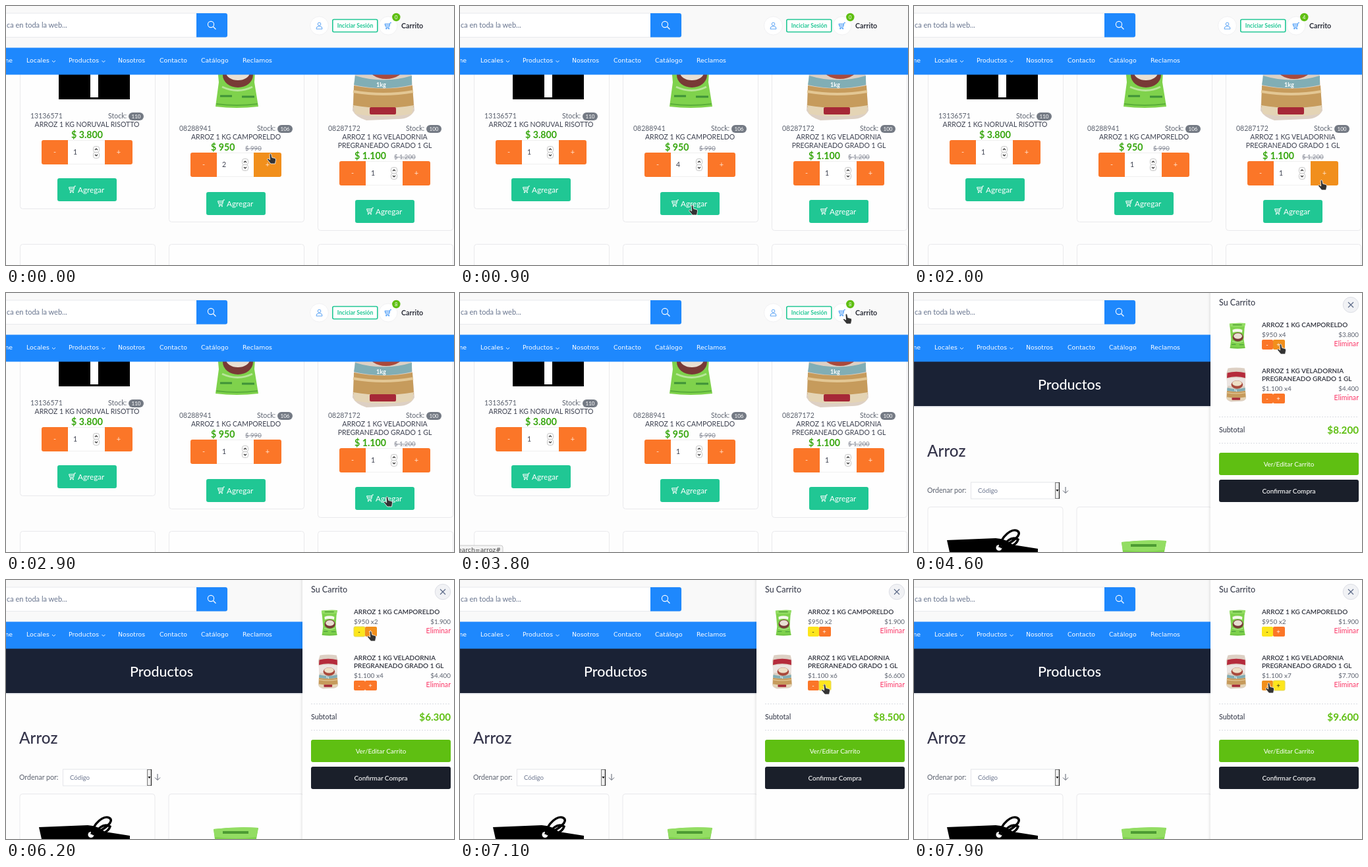
Write an HTML page that moves like this. It is 680 px wide and 394 px high and loops after 8000 ms.

```html
<!DOCTYPE html>
<html lang="es">
<head>
<meta charset="utf-8">
<title>Carrito</title>
<style>
html, body { margin: 0; width: 100%; height: 100%; overflow: hidden; background: #fdfdfd }
svg { display: block; width: 680px; height: 394px }
text { font-family: Lato, "Open Sans", sans-serif; white-space: pre }
.nav { font-family: "DejaVu Sans", sans-serif }
</style>
</head>
<body>
<svg id="stage" viewBox="0 0 680 394"></svg>
<script>
const stage = document.getElementById('stage');
const $ = id => document.getElementById(id);
const INK = '#3d4150', GRAY = '#5b616e', BLUE = '#1e88fd', ORANGE = '#fb7628',
      AMBER = '#f18f1c', YELLOW = '#fde61c', TEAL = '#20c794', GREEN = '#5fbf12';

const rect = (x, y, w, h, fill, more = '') =>
  `<rect x="${x}" y="${y}" width="${w}" height="${h}" fill="${fill}" ${more}/>`;
const circle = (x, y, r, fill, more = '') =>
  `<circle cx="${x}" cy="${y}" r="${r}" fill="${fill}" ${more}/>`;
const path = (d, fill = 'none', stroke = 'none', w = 1, more = '') =>
  `<path d="${d}" fill="${fill}" stroke="${stroke}" stroke-width="${w}" ${more}/>`;
const text = (x, y, s, size, fill = INK, more = '') =>
  `<text x="${x}" y="${y}" font-size="${size}" fill="${fill}" ${more}>${s}</text>`;
const group = (s, more = '') => `<g ${more}>${s}</g>`;
const at = (x, y, s, k = 1) => group(s, `transform="translate(${x} ${y}) scale(${k})"`);
const MID = 'text-anchor="middle"', END = 'text-anchor="end"';
const BOLD = 'font-weight="700"', MEDIUM = 'font-weight="500"';

const trolley = (x, y, color, k = 1) =>
  at(x, y, path('M11 0H9L7.6 6.5H2L.5 1.8H8.6M1.3 4H8M2 8.3H7.6', 'none', color, 1) +
    circle(2.8, 9.5, .9, color) + circle(7, 9.5, .9, color), k);

// Rice bags, drawn at catalogue size
const greenBag =
  path('M1 2Q35-2 69 0L65 22 62 70 68 107Q35 111 3 107L8 70 4 25Z', '#7fd24c') +
  path('M1 2Q35-2 69 0L66 14Q35 18 3 14Z', '#93dd63') +
  path('M15 7H54', 'none', '#4d9b33', 4) +
  path('M14 28Q35 20 56 28L55 40Q35 33 15 40Z', '#f6f8ee') +
  '<ellipse cx="37" cy="59" rx="23" ry="19" fill="#783a36"/>' +
  '<ellipse cx="37" cy="55" rx="18" ry="12" fill="#e9dfd2"/>' +
  path('M13 77Q37 88 59 77', 'none', '#b9e69a', 3) +
  path('M10 91H28M43 92H62', 'none', '#3f9238', 3) +
  path('M4 103Q35 107 67 103', 'none', '#5aae39', 2);
const brownBag =
  path('M8 3Q48-3 88 3L94 30 90 90 95 150Q88 163 70 163L22 165Q6 160 1 150L5 90 0 30Z', '#ddd0c4') +
  path('M5 25Q48 14 91 25L92 50Q48 38 3 50Z', '#b52b3c') +
  path('M3 53Q48 42 92 53L90 88H5Z', '#ece5e2') +
  '<ellipse cx="52" cy="82" rx="28" ry="20" fill="#a94a3c"/>' +
  '<ellipse cx="52" cy="76" rx="23" ry="13" fill="#eee0c7"/>' +
  path('M5 97Q48 110 91 97V111Q48 121 3 111Z', '#81aeb5') +
  path('M3 112Q48 121 92 112L94 145Q48 155 2 145Z', '#c69b5c') +
  text(37, 114, '1kg', 9, '#fff', BOLD) +
  path('M2 121Q48 129 93 121', 'none', '#e3c794', 4) +
  path('M2 142Q48 150 94 142L91 155Q48 163 5 155Z', '#e4d4b5') +
  rect(27, 145, 40, 11, '#a62837', 'rx="2"');

const card = (x, y, h) => rect(x + .5, y + .5, 205, h, '#fefefe', 'rx="4" stroke="#e9e9ec"');

// Product cards: [x, id line, stock, code, title lines, price, old price, controls y, button y, bottom]
const products = [
  [21, 171, 110, '13136571', ['ARROZ 1 KG NORUVAL RISOTTO'], '$ 3.800', '', 204, 262, 308],
  [247, 190, 106, '08288941', ['ARROZ 1 KG CAMPORELDO'], '$ 950', '$ 990', 223, 283, 328],
  [473, 190, 100, '08287172', ['ARROZ 1 KG VELADORNIA', 'PREGRANEADO GRADO 1 GL'], '$ 1.100', '$ 1.200', 236, 295, 341]
];
const zones = [];   // clickable areas: {id, x, y, w, h, view}
const zone = (id, x, y, w, h, view) => zones.push({ id, x, y, w, h, view });

function product([x, y, stock, code, lines, price, old, cy, by, bottom], i) {
  zone('less' + i, x + 33, cy, 40, 37, 'list');
  zone('more' + i, x + 129, cy, 42, 37, 'list');
  zone('', x + 57, by, 90, 35, 'list');
  const mid = x + 102, py = cy - 3;
  const arrow = (ay, d) => rect(x + 111.5, ay, 9, 9, '#fff', 'rx="3" stroke="#b5b5b5" stroke-width=".8"') +
    path(`M${x + 114} ${ay + 4.5 - d}l2 ${2 * d} 2 ${-2 * d}`, 'none', '#333', 1.2);
  return card(x, 50, bottom - 50) +
    text(x + 16, y, code, 10.5, GRAY) + text(x + 134, y, 'Stock:', 10.5, GRAY) +
    rect(x + 165, y - 9, 23, 12, '#747a84', 'rx="6"') + text(x + 176.5, y, stock, 8, '#fff', MID) +
    lines.map((s, n) => text(mid, y + 13 + n * 12.5, s, 10.5, INK, MID)).join('') +
    (old
      ? text(x + (i == 1 ? 64 : 56), py, price, 14.2, '#36a60d', BOLD) +
        text(x + 116, py, old, 9.6, '#858995', 'text-decoration="line-through"')
      : text(mid, py - 0, price, 14.2, '#36a60d', BOLD + MID.padStart(MID.length + 1))) +
    rect(x + 72, cy + .5, 58, 36, '#fff', 'stroke="#f0f0f0"') +
    path(`M${x + 73} ${cy}h-37q-3 0-3 3v31q0 3 3 3h37z`, ORANGE, 'none', 1, `id="less${i}"`) +
    path(`M${x + 129} ${cy}h39q3 0 3 3v31q0 3-3 3h-39z`, ORANGE, 'none', 1, `id="more${i}"`) +
    text(x + 53, cy + 22, '-', 11, '#ffe3cf', MID) + text(x + 150, cy + 22, '+', 11, '#ffe3cf', MID) +
    text(x + 81, cy + 22, 1, 10.5, INK, `id="qty${i}"`) +
    arrow(cy + 9.5, -1) + arrow(cy + 18.5, 1) +
    rect(x + 57, by, 90, 35, TEAL, 'rx="3"') +
    trolley(x + 74, by + 12, '#fff') + text(x + 88, by + 22, 'Agregar', 11.7, '#fff');
}

const list = group(
  products.map(product).join('') +
  rect(80, 100, 108, 42, '#000') + rect(128, 100, 12, 39, '#fff') +
  at(315, 46, greenBag) + at(525, 9, brownBag) +
  [21, 247, 473].map(x => card(x, 362, 60)).join('') +
  group(rect(-5, 384, 70, 20, '#f4f4f4', 'rx="3" stroke="#c8c8c8"') +
    text(62, 393.5, 'earch=arroz#', 9.3, '#444', END + ' class="nav"'), 'id="status"'),
  'id="list"');

const catalogue = group(
  rect(0, 104, 680, 68.5, '#1a2235') + rect(0, 172, 680, 2, '#e9eaee') +
  text(236, 147, 'Productos', 21.5, '#fff', `${MID} ${MEDIUM}`) +
  text(20, 249, 'Arroz', 24.3, '#34344a', MEDIUM) +
  text(20, 304, 'Ordenar por:', 10.6, GRAY) +
  rect(86.5, 288, 134, 25, '#fff', 'stroke="#e4e6ea"') + text(97, 304, 'Código', 9.7, '#6d7790') +
  rect(214.5, 288.5, 6, 24, '#eee', 'stroke="#777"') + path('M215.500 299h4l-2 3z', '#000') +
  path('M220.500 288V313', 'none', '#222', 1.2) +
  path('M230 295V304M226 300.500l4 4 4-4', 'none', GRAY, 1) +
  [21, 247, 473].map(x => card(x - .5, 325, 100)).join('') +
  path('M50 376L124 373Q140 374 150 383L188 389V394H54Z', '#000') +
  circle(129, 387.5, 4.5, '#fff') +
  path('M130 387C132 370 149 357 157 362S151 379 131 387M134 385Q148 368 158 375Q156 382 146 386', 'none', '#000', 3.5) +
  at(314, 377, greenBag) + at(526, 355, brownBag),
  'id="catalogue"');

const menu = [[31, 'Locales'], [95, 'Productos'], [170, 'Nosotros'], [233, 'Contacto'], [296, 'Catálogo'], [359, 'Reclamos']];
const header =
  rect(0, 0, 680, 64, '#f9f9f9') +
  rect(-5, 11, 341, 36.5, '#fff', 'rx="3" stroke="#e8e9ed"') +
  text(1, 33, 'ca en toda la web...', 11, '#67748e') +
  path('M289 11h44q3 0 3 3v30.500q0 3-3 3h-44z', BLUE) +
  circle(311, 28, 4.6, 'none', 'stroke="#fff" stroke-width="1.100"') + path('M314.500 31.500l4 4', 'none', '#fff', 1.2) +
  circle(475.5, 30, 14, '#fff', 'stroke="#f1f1f3"') +
  circle(475.5, 27.5, 2.3, 'none', 'stroke="#5ba4f5"') +
  path('M471 35q0-4 3-4h3q3 0 3 4z', 'none', '#5ba4f5', 1) +
  rect(495.8, 20.5, 68, 19, '#fff', `rx="2" stroke="${TEAL}" stroke-width="1.600"`) +
  text(530, 33, 'Inciciar Sesión', 8.6, TEAL, `${MID} ${BOLD}`) +
  circle(580, 30, 14, '#fff', 'stroke="#f1f1f3"') + trolley(574.5, 25.5, '#3c94f7', .95) +
  circle(592.3, 17, 6.2, GREEN) + text(592.3, 19.8, 0, 7.5, '#fff', MID + ' id="badge"') +
  text(600, 33.5, 'Carrito', 10.7, '#2c2f3a', BOLD) +
  rect(0, 63.5, 680, 41, BLUE) +
  text(10, 86, 'Home', 9.35, '#fff', END + ' class="nav"') +
  menu.map(([x, s]) => text(x, 86, s, 9.35, '#fff', 'class="nav"')).join('') +
  [72.5, 148].map(x => path(`M${x - 2.5} 83l2.500 2.500 2.500-2.500`, 'none', '#fff', .9)).join('');
zone('cart', 567, 16, 28, 28, 'list');

// Cart rows: [name lines, unit price, name y]
const rows = [
  [['ARROZ 1 KG CAMPORELDO'], 950, 52],
  [['ARROZ 1 KG VELADORNIA', 'PREGRANEADO GRADO 1 GL'], 1100, 121.5]
];
function row([lines, , y], i) {
  const base = y + 12.5 * (lines.length - 1), by = Math.round(base + 19);
  zone('minus' + i, 528, by, 17, 15, 'catalogue');
  zone('plus' + i, 545, by, 18, 15, 'catalogue');
  return lines.map((s, n) => text(528, y + n * 12.2, s, 10, '#2d303b', 'font-weight="600"')).join('') +
    text(528, base + 14.5, '', 10, GRAY, `id="unit${i}"`) +
    text(675, base + 14.5, '', 9.8, GRAY, `${END} id="sum${i}"`) +
    text(675, base + 29, 'Eliminar', 10.6, '#fb3767', END) +
    rect(528, by, 17, 15, ORANGE, `rx="2" id="minus${i}"`) +
    rect(545, by, 18, 15, ORANGE, `rx="2" id="plus${i}"`) +
    text(536, by + 11, '-', 9.5, '#fff', `${MID} id="minus${i}s"`) +
    text(553, by + 11, '+', 9.5, '#fff', `${MID} id="plus${i}s"`);
}
const dashes = y => path(`M463 ${y}H675`, 'none', '#d9dce2', 1, 'stroke-dasharray="2 2"');
const panel = group(
  rect(446, 0, 2, 394, '#000', 'opacity=".02"') + rect(448, 0, 2, 394, '#000', 'opacity=".06"') +
  rect(450, 0, 460, 394, '#fefefe') +
  text(463, 19, 'Su Carrito', 12.5, INK, MEDIUM) +
  circle(663, 18, 11.7, '#f1f2f5', 'stroke="#dcdee5"') +
  path('M659 14l8 8M667 14l-8 8', 'none', '#596786', 1.1) +
  at(478.5, 46, greenBag, .355) + at(474, 113.5, brownBag, .315) +
  rows.map(row).join('') +
  dashes(188.5) + dashes(228.5) +
  text(463, 212, 'Subtotal', 10.7, INK, MEDIUM) +
  text(675, 214, '', 15.2, GREEN, `${END} ${BOLD} id="total"`) +
  rect(463, 243, 212, 34, GREEN, 'rx="3"') + text(569, 264, 'Ver/Editar Carrito', 9.9, '#fff', MID) +
  rect(463, 284, 212, 34, '#1a1f2a', 'rx="3"') + text(569, 305, 'Confirmar Compra', 10, '#fff', `${MID} ${MEDIUM}`),
  'id="panel"');

const cursors = {
  hand: path('M-1 .5Q.5-1 1.700.5L2.700 5.500 7 6.500Q9 7 8.500 9.500L7.500 15H.8L-4.500 8.500Q-4 6.500-2.300 7.500L-.3 9Z', '#333', '#fff', .8),
  arrow: path('M0 0V13L3 10.300 5 15 7.200 14 5.200 9.500H9.300Z', '#222', '#fff', .9),
  beam: path('M-2.500-6Q0-6 0-4Q0-6 2.500-6M0-4V4M-2.500 6Q0 6 0 4Q0 6 2.500 6', 'none', '#333', 1.2)
};

stage.innerHTML = list + catalogue + header + panel +
  group(Object.entries(cursors).map(([k, s]) => group(s, `id="${k}"`)).join(''), 'id="cursor"');

// Pointer stops: [ms, x, y]
const stops = [
  [0, 401, 225], [550, 401, 226], [850, 352, 303], [1150, 352, 304], [1700, 612, 262], [1900, 618, 265],
  [2550, 618, 265], [2800, 578, 310], [3050, 578, 310], [3650, 586, 32], [3900, 586, 32], [4050, 605, 50],
  [4150, 605, 50], [4500, 556, 78], [4650, 556, 78], [4850, 536, 78], [5800, 536, 78], [6050, 553, 78],
  [6300, 553, 78], [6650, 553, 159], [7400, 553, 159], [7650, 538, 157], [8000, 538, 157]
];
const ADD_FIRST = 1000, ADD_SECOND = 2900, OPEN = 3900, SLIDE = 370;
const FIRST_CLICKS = [200, 450], SECOND_CLICKS = [2100, 2300, 2500];
const MINUS_CLICKS = [5000, 5400], PLUS_CLICKS = [6800, 7000, 7200];

const count = (clicks, t) => clicks.filter(c => c <= t).length;
const money = n => '$' + String(n).replace(/(\d)(\d{3})$/, '$1.$2');
const show = (id, on) => $(id).style.display = on ? '' : 'none';

function pointer(t) {
  const i = Math.max(1, stops.findIndex(s => s[0] > t));
  const [t0, x0, y0] = stops[i - 1], [t1, x1, y1] = stops[i];
  const u = (t - t0) / (t1 - t0), e = u * u * (3 - 2 * u);
  return [x0 + (x1 - x0) * e, y0 + (y1 - y0) * e];
}

function draw(t) {
  const view = t < OPEN ? 'list' : 'catalogue';
  const [x, y] = pointer(t);
  const hit = zones.find(z => z.view == view && x >= z.x && x < z.x + z.w && y >= z.y && y < z.y + z.h);
  const hover = hit && hit.id;
  const shape = hit ? 'hand' : t >= 3980 && t < 4220 ? 'beam' : 'arrow';

  show('list', view == 'list');
  show('catalogue', view == 'catalogue');
  show('status', hover == 'cart');
  for (const k in cursors) show(k, k == shape);
  $('cursor').setAttribute('transform', `translate(${x} ${y})`);

  $('badge').textContent = t < ADD_FIRST ? 0 : t < ADD_SECOND ? 4 : 8;
  $('qty1').textContent = t < ADD_FIRST ? 2 + count(FIRST_CLICKS, t) : 1;
  $('qty2').textContent = t < ADD_SECOND ? 1 + count(SECOND_CLICKS, t) : 1;

  const amounts = [4 - count(MINUS_CLICKS, t), 4 + count(PLUS_CLICKS, t)];
  let total = 0;
  rows.forEach(([, price], i) => {
    const sum = price * amounts[i];
    total += sum;
    $('unit' + i).textContent = `${money(price)} x${amounts[i]}`;
    $('sum' + i).textContent = money(sum);
  });
  $('total').textContent = money(total);

  const pressed = { minus0: t >= MINUS_CLICKS[0], plus1: t >= PLUS_CLICKS[0] };
  const focus = pressed.plus1 ? 'plus1' : pressed.minus0 ? 'minus0' : '';
  for (const { id } of zones) {
    if (!id || id == 'cart') continue;
    const el = $(id);
    el.setAttribute('fill', pressed[id] ? YELLOW : id == hover ? AMBER : ORANGE);
    el.setAttribute('stroke', id == focus ? '#e2d65a' : 'none');
    if ($(id + 's')) $(id + 's').setAttribute('fill', pressed[id] ? '#222' : '#fff');
  }

  const u = Math.min(1, Math.max(0, (t - OPEN) / SLIDE)), p = 1 - (1 - u) ** 3;
  show('panel', p > 0);
  $('panel').setAttribute('transform', `translate(${230 * (1 - p)} 0)`);
  $('panel').setAttribute('opacity', p);
}

const start = performance.now();
function tick() {
  draw((performance.now() - start) % 8000);
  requestAnimationFrame(tick);
}
tick();
</script>
</body>
</html>
```
